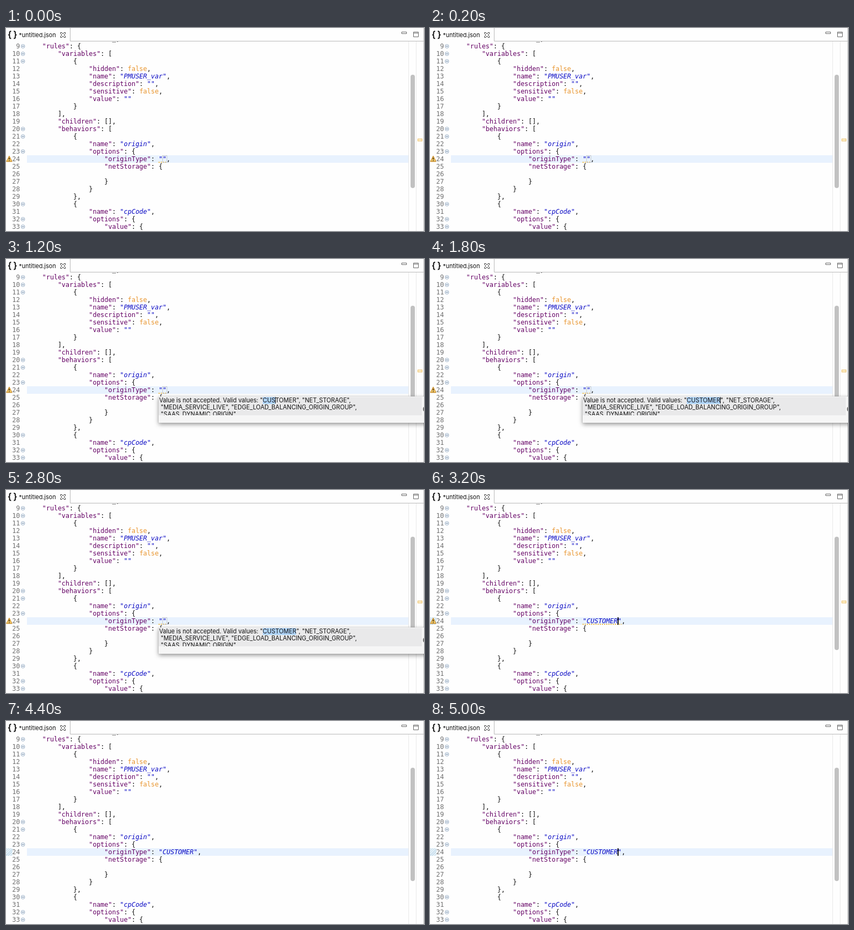
These frames come from a looping animation (778x378 px, 5.2 s). An HTML page:

```html
<!DOCTYPE html>
<html lang="en">
<head>
<meta charset="utf-8">
<title>JSON editor</title>
<style>
html, body { margin: 0; width: 100%; height: 100%; overflow: hidden; background: #fefefe; }
#stage { position: relative; width: 778px; height: 378px; overflow: hidden; background: #fefefe; }
#stage div, #stage svg { position: absolute; }
.ui { font: 11px/13px Inter, sans-serif; color: #111; }

/* editor */
#editor { inset: 25px 0 0 0; overflow: hidden; }
.row { left: 0; width: 749px; height: 14px; font: 12px/14px "DejaVu Sans Mono", monospace; color: #111; }
.num { right: 723px; top: 0; color: #707070; }
.code { left: 38.6px; top: 0; white-space: pre; }
.fold { left: 27px; top: 3px; }
.current { left: 39px; top: 212px; width: 710px; height: 14px; background: #e8f2fe; }
.key { color: #640064; }
.str { color: #0808c4; font-style: italic; position: relative; }
.bool { color: #e8942c; }
.warn::after {
  content: ""; position: absolute; left: 0; right: 0; top: 12px; height: 2px;
  background: repeating-linear-gradient(90deg, #f0bb45 0 2px, transparent 2px 4px);
}
.slot { left: 290.5px; top: 212px; width: 7px; height: 12px; border: 1px solid #c3c8d0; }
.caret { left: 349px; top: 212px; width: 2px; height: 14px; background: #111; }
.changed { left: 0; top: 212px; width: 12px; height: 14px;
  background: repeating-linear-gradient(135deg, #c3dcec 0 1px, #e6f1f8 1px 3px); }

/* tooltip */
#tip { left: 284px; top: 256px; width: 520px; height: 49px; font-size: 11.08px; background: #f6f6f6;
  box-shadow: 0 3px 8px rgba(0, 0, 0, .4), 0 0 1px rgba(0, 0, 0, .4); }
#tip .text { left: 0; top: 1px; width: 490px; height: 34px; overflow: hidden; background: #e9e9ea; }
#tip p { margin: 0; padding-left: 1px; white-space: pre; }
#tip .bar { left: 492px; top: 19px; width: 8px; height: 9px; border-radius: 4px; background: #777; }
.start { left: 0; top: 0; width: 1px; height: 13px; background: #111; }
.sel { position: relative; }
.sel::after { content: ""; position: absolute; right: -1px; top: 0; width: 1px; height: 13px; background: #111; }

/* timeline */
#tip, .anim, .sel, .sel::after, .warn::after { animation: 5.2s step-end infinite; }
#tip { animation-name: tip; }
.before { animation-name: before; }
.after { animation-name: after; }
.alert, .after .warn::after { animation-name: alert; }
.caret { animation-name: caret; }
.start { animation-name: start; }
.s1 { animation-name: s1; } .s1::after { animation-name: c1; }
.s2 { animation-name: s2; } .s2::after { animation-name: c2; }
.s3 { animation-name: s3; } .s3::after { animation-name: c3; }
.s4 { animation-name: s4; } .s4::after { animation-name: c4; }
@keyframes tip { 0%, 61.53%, 100% { opacity: 0 } 7.69% { opacity: 1 } }
@keyframes before { 0% { opacity: 1 } 61.53%, 100% { opacity: 0 } }
@keyframes after { 0% { opacity: 0 } 61.53%, 100% { opacity: 1 } }
@keyframes alert { 0% { opacity: 1 } 69.23%, 100% { opacity: 0 } }
@keyframes caret { 0%, 65.38%, 84.61% { opacity: 0 } 61.53%, 73.07%, 96.15%, 100% { opacity: 1 } }
@keyframes start { 0%, 23.07%, 100% { opacity: 0 } 11.53% { opacity: 1 } }
@keyframes s1 { 0% { background: transparent } 23.07%, 100% { background: #b0d5fb } }
@keyframes s2 { 0% { background: transparent } 26.92%, 100% { background: #b0d5fb } }
@keyframes s3 { 0% { background: transparent } 30.76%, 100% { background: #b0d5fb } }
@keyframes s4 { 0% { background: transparent } 34.61%, 100% { background: #b0d5fb } }
@keyframes c1 { 0%, 26.92%, 100% { opacity: 0 } 23.07% { opacity: 1 } }
@keyframes c2 { 0%, 30.76%, 100% { opacity: 0 } 26.92% { opacity: 1 } }
@keyframes c3 { 0%, 34.61%, 100% { opacity: 0 } 30.76% { opacity: 1 } }
@keyframes c4 { 0%, 42.3%, 53.84%, 100% { opacity: 0 } 34.61%, 46.15% { opacity: 1 } }
</style>
</head>
<body>
<div id="stage">
  <div id="editor">
    <div class="current"></div>
    <div class="anim after changed"></div>
    <div id="rows" style="left:0;top:0;width:749px"></div>
    <div class="anim before slot"></div>
    <div class="anim caret"></div>
    <svg class="anim alert" style="left:0;top:212px" width="13" height="14">
      <path d="M6 1.5 11 11.5H1Z" fill="#fbd677" stroke="#c88d2b" stroke-width="1.3" stroke-linejoin="round"/>
      <path d="M6 4.5v3.6M6 9v1.5" stroke="#3d2a08" stroke-width="1.6"/>
    </svg>
  </div>

  <svg style="left:0;top:0" width="778" height="378" fill="none">
    <path d="M119.5 0V24.5H778" stroke="#b9b9b9"/>
    <path d="M9.5 6q-2.8 0-2.8 2.5v2q0 2-2.2 2.3 2.2.3 2.2 2.3v2q0 2.5 2.8 2.5M14.5 6q2.8 0 2.8 2.5v2q0 2 2.2 2.3-2.2.3-2.2 2.3v2q0 2.5-2.8 2.5" stroke="#151515" stroke-width="2"/>
    <path d="M101.5 8.5h2.5l2 2.5 2-2.5h2.5v2l-2.5 2.5 2.5 2.5v2H108l-2-2.5-2 2.5h-2.5v-2l2.5-2.5-2.5-2.5z" stroke="#333"/>
    <path d="M736.5 7.5h9v3h-9z" stroke="#666"/>
    <path d="M758.5 7.5h9v9h-9zM758.5 9.5h9" stroke="#666"/>
    <path d="M749.5 25V378M763.5 25V378" stroke="#e8e8e8"/>
    <path d="M777.5 0V378" stroke="#c4c4c4"/>
    <rect x="753" y="87" width="8" height="211" rx="4" fill="#c1c1c1"/>
    <rect class="anim alert" x="766.5" y="206.5" width="8" height="4" fill="#fdedc4" stroke="#ebc374"/>
  </svg>
  <div class="ui" style="left:24px;top:7px">*untitled.json</div>

  <div id="tip" class="ui">
    <div class="text">
      <p>Value is not accepted. Valid values: "<span class="sel s1">CUS</span><span class="sel s2">TO</span><span class="sel s3">ME</span><span class="sel s4">R</span>", "NET_STORAGE",</p>
      <p> "MEDIA_SERVICE_LIVE", "EDGE_LOAD_BALANCING_ORIGIN_GROUP",</p>
      <p> "SAAS_DYNAMIC_ORIGIN"</p>
      <div class="anim start"></div>
    </div>
    <div class="bar"></div>
  </div>
</div>
<script>
const FIRST = 8, ROW = 14;
const FOLDS = [9, 10, 11, 20, 21, 23, 30, 32, 33];
const lines = String.raw`                      _,
    "rules": {
        "variables": [
            {
                "hidden": false,
                "name": "PMUSER_var",
                "description": "",
                "sensitive": false,
                "value": ""
            }
        ],
        "children": [],
        "behaviors": [
            {
                "name": "origin",
                "options": {
                    "originType": "",
                    "netStorage": {

                    }
                }
            },
            {
                "name": "cpCode",
                "options": {
                    "value": {`.split("\n");

const foldIcon = `<svg class="fold" width="9" height="9">
  <circle cx="4.5" cy="4" r="3.5" fill="#f0f5fa" stroke="#a3b4c8"/>
  <path d="M2.5 4h4" stroke="#5f7896"/></svg>`;

const paint = (text, mark = "") => text.replace(/("[^"]*")(:?)|false/g, (all, str, colon) =>
  !str ? `<span class="bool">${all}</span>`
  : colon ? `<span class="key">${str}</span>:`
  : `<span class="str ${mark}">${str}</span>`);

const code = (html, cls = "") => `<div class="code ${cls}">${html}</div>`;

document.getElementById("rows").innerHTML = lines.map((text, i) => {
  const n = FIRST + i;
  const body = n === 24
    ? code(paint(text, "warn"), "anim before") +
      code(paint(text.replace('""', '"CUSTOMER"'), "warn"), "anim after")
    : code(paint(text));
  return `<div class="row" style="top:${(i - 1) * ROW + 2}px">
    <div class="num">${n}</div>${FOLDS.includes(n) ? foldIcon : ""}${body}</div>`;
}).join("");
</script>
</body>
</html>
```
